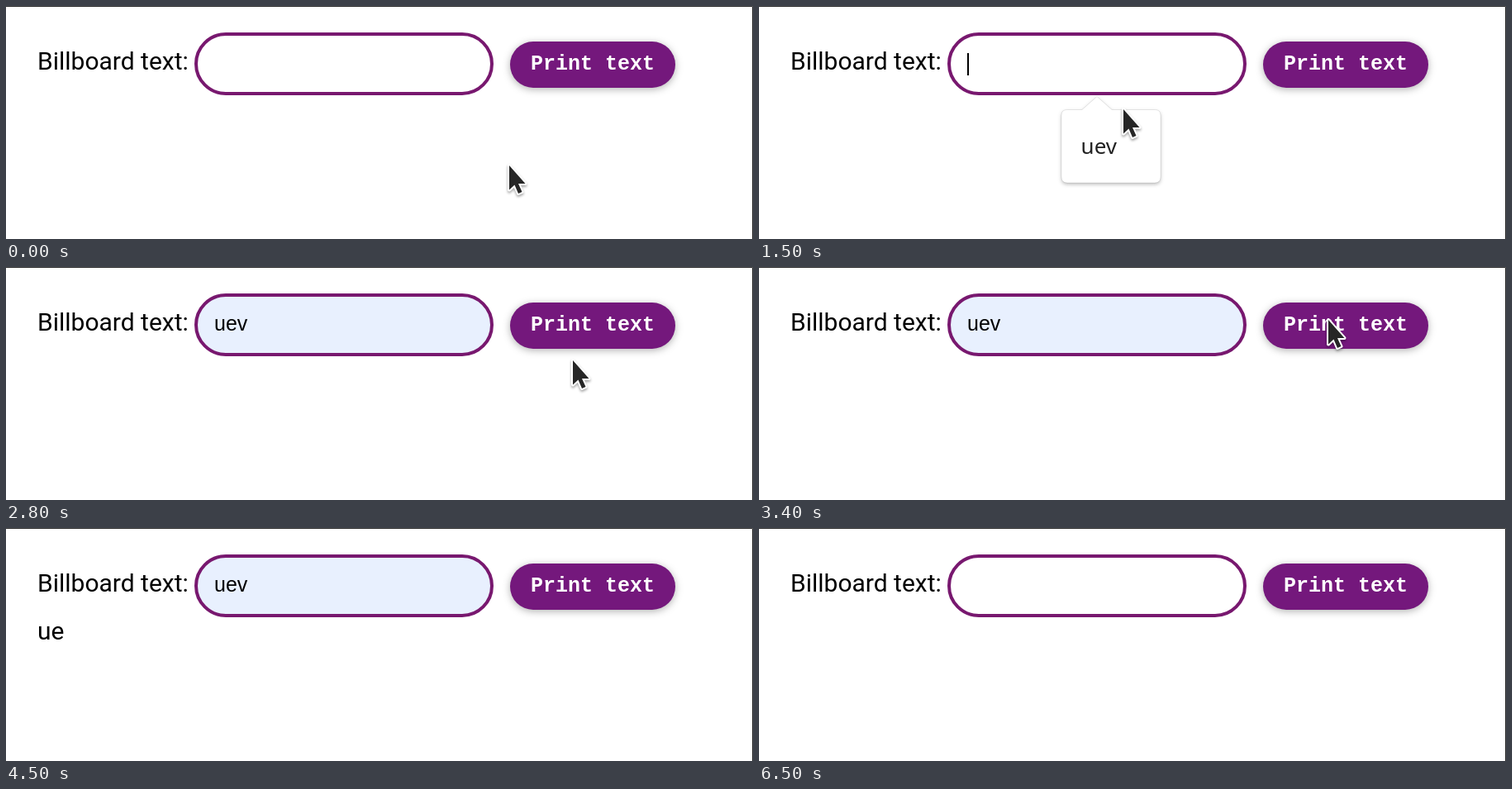
Recreate the animation shown at these times as an HTML page. Size 904x282 px, loop 8 s.

```html
<!DOCTYPE html>
<html lang="en">
<head>
<meta charset="utf-8">
<title>Billboard text</title>
<style>
  html, body { margin: 0; width: 100%; height: 100%; overflow: hidden; background: #fff; }
  svg { display: block; width: 904px; height: 282px; }
  text { white-space: pre; }
  .label { font: 30px Roboto, sans-serif; }
  .value { font: 25px "Liberation Sans", Arial, sans-serif; }
  .button { font: bold 25px "Liberation Mono", monospace; fill: #fff; }
  .option { font: 26px "Noto Sans", sans-serif; fill: #222; }
  .raised { filter: drop-shadow(0 2px 5px rgba(0, 0, 0, .3)); }
  .popup { filter: drop-shadow(0 2px 2px rgba(0, 0, 0, .25)); }
  .pointer { filter: drop-shadow(0 2px 1.5px rgba(0, 0, 0, .35)); }
</style>
</head>
<body>
<svg viewBox="0 0 904 282">
  <rect width="904" height="282" fill="#fff"/>
  <path d="M0 .5H903.5V282" fill="none" stroke="#2a2a2a"/>

  <text class="label" x="38" y="77">Billboard text:</text>
  <rect id="field" x="230" y="34" width="358" height="72" rx="36" stroke="#78186f" stroke-width="4"/>
  <text id="value" class="value" x="252" y="77"></text>
  <rect id="caret" y="57" width="2" height="27"/>

  <rect id="button" class="raised" x="610" y="43" width="200" height="56" rx="28"/>
  <text class="button" x="635" y="77">Print text</text>
  <text id="output" class="label" x="38" y="135"></text>

  <g id="popup">
    <path class="popup" fill="#fff" stroke="#000" stroke-opacity=".09"
      d="M373 125.5H391L409 109.5L427 125.5H479Q486 125.5 486 132V207Q486 214 479 214H373Q366 214 366 207V132Q366 125.5 373 125.5Z"/>
    <rect id="row" x="366" y="134.500" width="120" height="71" fill="#e8e8e8"/>
    <text id="option" class="option" x="389.600" y="179"></text>
  </g>

  <g id="arrow" class="pointer">
    <path d="M0 0V29.500L6.500 23.500L11 34L15.500 32L11 22H19.500Z"
      fill="#262626" stroke="#fff" stroke-width="4" stroke-linejoin="round" paint-order="stroke"/>
  </g>
  <g id="beam" fill="none" stroke-linecap="round">
    <path id="beamEdge" stroke="#fff" stroke-width="5"/>
    <path id="beamCore" stroke="#262626" stroke-width="2"/>
  </g>
</svg>
<script>
const LOOP = 8000, STEP = 100;
const WORD = "uev";
const $ = id => document.getElementById(id);
const set = (id, attrs) => {
  for (const key in attrs) $(id).setAttribute(key, attrs[key]);
};
const show = (id, on) => set(id, { visibility: on ? "visible" : "hidden" });
const within = (t, from, to) => t >= from && t < to;

// Pointer stops: time, x, y
const stops = [
  [0, 609, 193], [300, 593, 174], [400, 545, 134], [500, 492, 98],
  [600, 461, 80], [700, 452, 74], [1500, 441, 125], [1600, 435, 149],
  [1700, 431, 165], [2500, 449, 162], [2600, 532, 148], [2700, 632, 127],
  [2800, 686, 113], [2900, 693, 92], [3000, 691, 73], [3100, 689, 64],
  [4000, 683, 35]
];

const beamShape = "M-5 -15Q0 -15 0 -11Q0 -15 5 -15M0 -11V11M-5 15Q0 15 0 11Q0 15 5 15";
set("beamEdge", { d: beamShape });
set("beamCore", { d: beamShape });
$("option").textContent = WORD;

function drawPointer(t) {
  const [, x, y] = stops.findLast(stop => stop[0] <= t);
  const overField = within(t, 500, 1500);
  const place = { transform: `translate(${x} ${y})` };
  set("arrow", place);
  set("beam", place);
  show("arrow", t < 4100 && !overField);
  show("beam", overField);
}

function drawField(t) {
  const filled = within(t, 1600, 6500);
  set("field", { fill: filled ? "#e8f0fe" : "#fff" });
  $("value").textContent = filled ? WORD : "";
  set("caret", filled ? { x: 291, y: 56 } : { x: 252, y: 57 });
  show("caret", within(t, 1100, 1600) || within(t, 2200, 2700));
}

function drawPopup(t) {
  const fading = t >= 2200;
  set("popup", {
    display: within(t, 1100, 2300) ? "inline" : "none",
    opacity: fading ? 0.5 : 1,
    transform: fading ? "translate(426 169.5) scale(.982) translate(-426 -169.5)" : ""
  });
  show("row", t >= 1600);
}

function drawButton(t) {
  const hover = within(t, 2900, 4100);
  const pressed = within(t, 3400, 3500);
  set("button", { fill: hover && !pressed ? "#87317f" : "#74187c" });
}

function drawOutput(t) {
  const count = within(t, 3500, 6500) ? Math.floor((t - 2500) / 1000) : 0;
  $("output").textContent = WORD.slice(0, count);
}

function render(time) {
  const t = Math.floor((time % LOOP) / STEP) * STEP;
  drawField(t);
  drawPopup(t);
  drawButton(t);
  drawOutput(t);
  drawPointer(t);
}

const start = performance.now();
function tick() {
  render(performance.now() - start);
  requestAnimationFrame(tick);
}
tick();
</script>
</body>
</html>
```
